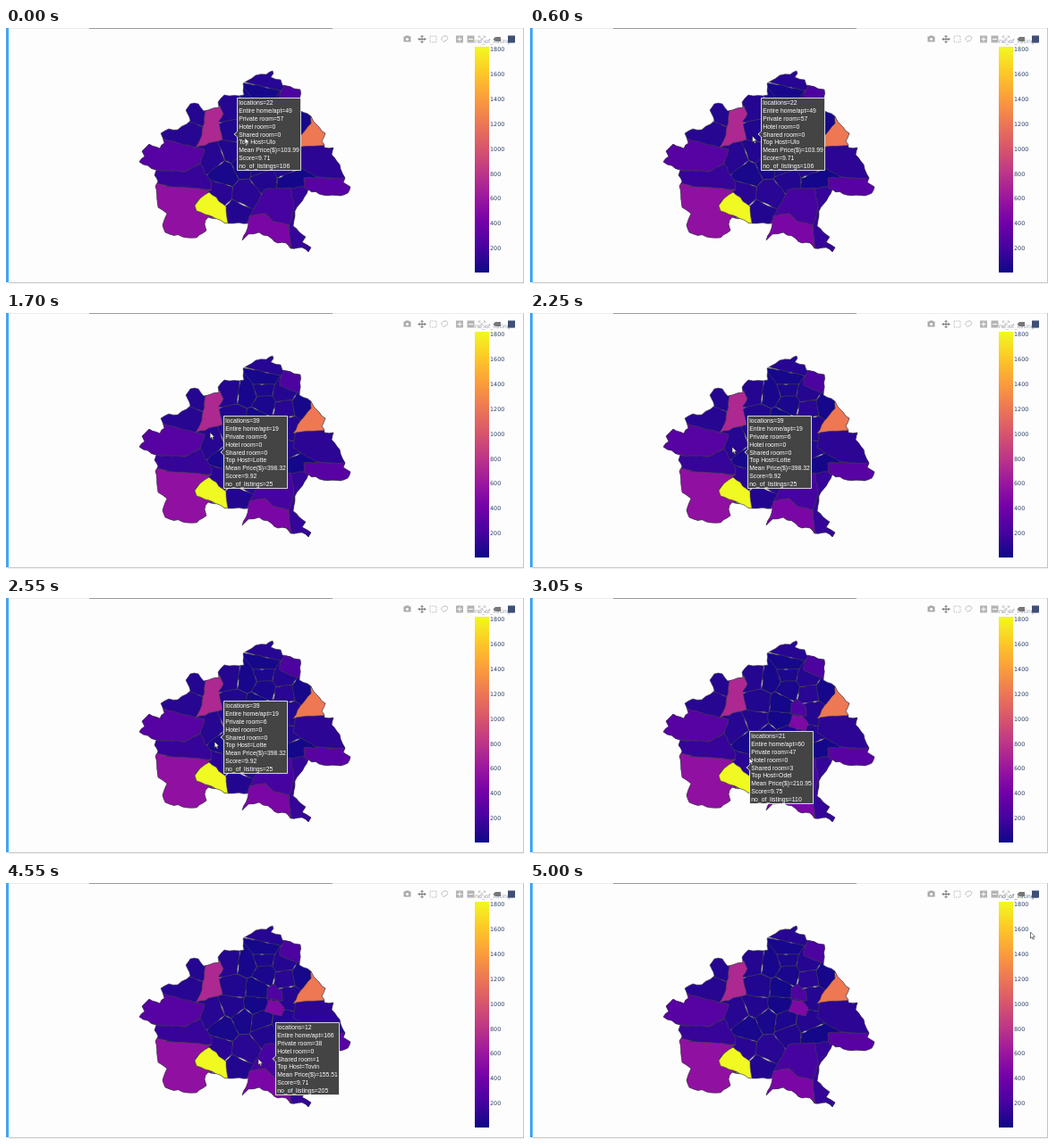
An HTML page for the animation above (5050 ms loop, 579 by 288 pixels).

```html
<!DOCTYPE html>
<html lang="en">
<head>
<meta charset="utf-8">
<title>Listings map</title>
<style>
  html, body { margin: 0; width: 100%; height: 100%; overflow: hidden; background: #fefdfe; }
  svg { display: block; width: 100%; height: 100%; }
  .label { font: 6.4px "DejaVu Sans", sans-serif; fill: #2a3f5f; }
  .tip { font: 6.8px "Liberation Sans", Arial, sans-serif; fill: #fff; }
  .area { stroke: #444; stroke-width: .6; stroke-linejoin: round; }
  .icon { fill: none; stroke: #bcbcbc; stroke-width: 1; }
</style>
</head>
<body>
<svg id="stage" viewBox="0 0 579 288"></svg>
<script>
const LOOP = 5050, STEP = 50, MAX = 1820;
const svg = document.getElementById('stage');

function add(parent, tag, attrs = {}, text) {
  const node = document.createElementNS('http://www.w3.org/2000/svg', tag);
  for (const key in attrs) node.setAttribute(key, attrs[key]);
  if (text !== undefined) node.textContent = text;
  parent.appendChild(node);
  return node;
}
const rect = (x, y, width, height, fill, parent = svg) =>
  add(parent, 'rect', { x, y, width, height, fill });
const mix = (a, b, k) => a + (b - a) * k;

const PLASMA = ['#0d0887', '#46039f', '#7201a8', '#9c179e', '#bd3786',
  '#d8576b', '#ed7953', '#fb9f3a', '#fdca26', '#f0f921'];

function colour(listings) {
  const v = Math.min(listings / MAX, .9999) * (PLASMA.length - 1), i = Math.floor(v);
  const channel = (hex, c) => parseInt(hex.slice(1 + c * 2, 3 + c * 2), 16);
  return `rgb(${[0, 1, 2].map(c =>
    Math.round(mix(channel(PLASMA[i], c), channel(PLASMA[i + 1], c), v - i)))})`;
}

const parse = s => s.split(' ').map(p => p.split(',').map(Number));

// Repeatable noise in -1..1 tied to a place
function noise(x, y) {
  const n = Math.sin(x * 12.9898 + y * 78.233) * 43758.5453;
  return (n - Math.floor(n)) * 2 - 1;
}

// Breaks each side into short pieces pushed sideways, like a surveyed border
function rough(points, amount) {
  return points.flatMap(([x0, y0], i) => {
    const [x1, y1] = points[(i + 1) % points.length];
    const len = Math.hypot(x1 - x0, y1 - y0), n = Math.max(1, Math.round(len / 5));
    return Array.from({ length: n }, (_, j) => {
      const x = mix(x0, x1, j / n), y = mix(y0, y1, j / n);
      const push = j ? noise(x, y) * amount / len : 0;
      return [x - (y1 - y0) * push, y + (x1 - x0) * push];
    });
  });
}

// Part of a polygon nearer to a than to b
function nearer(poly, a, b) {
  const side = ([x, y]) => (x - (a[0] + b[0]) / 2) * (b[0] - a[0]) + (y - (a[1] + b[1]) / 2) * (b[1] - a[1]);
  return poly.flatMap((p, i) => {
    const q = poly[(i + 1) % poly.length], sp = side(p), sq = side(q);
    const out = sp <= 0 ? [p] : [];
    if (sp * sq < 0) out.push([0, 1].map(c => mix(p[c], q[c], sp / (sp - sq))));
    return out;
  });
}

const OUTLINE = parse('298,48 299,51 296,55 307,58 309,64 322,68 329,69 328,92 341,99 344,105 357,118 ' +
  '353,127 356,134 366,134 364,142 373,153 379,168 377,173 385,178 382,185 374,188 350,186 338,181 ' +
  '323,205 321,222 335,234 331,240 341,246 338,251 331,246 318,247 313,241 304,241 297,236 283,229 ' +
  '271,231 264,238 271,219 249,219 226,212 222,220 224,227 213,235 202,235 178,229 175,221 180,208 ' +
  '170,201 167,177 170,172 166,165 168,159 149,150 155,144 152,138 160,130 172,135 177,129 173,118 ' +
  '182,113 192,114 206,104 201,92 206,85 215,85 221,93 238,89 237,83 244,75 266,75 265,62 279,53 291,52');

// Districts with their own shape; sides beyond the coast are cut by it
const DISTRICTS = [
  [280, '140,150 158,120 190,128 212,134 222,136 217,152 200,161 160,159'],
  [150, '160,159 200,161 217,152 230,174 229,181 184,178 160,172'],
  [550, '160,172 184,178 230,181 212,196 213,204 230,212 230,240 165,240'],
  [713, '223,92 239,87 243,96 238,104 242,125 212,134 219,120'],
  [MAX, '211,199 217,191 227,184 246,200 249,222 232,212 213,205'],
  [1210, '341,96 360,118 358,134 321,135 329,121 341,107'],
  [230, '307,72 312,62 332,68 330,92 306,81'],
  [110, '324,134 368,130 384,171 345,166 321,151'],
  [290, '333,168 384,168 390,180 380,190 350,189 333,180'],
  [140, '318,180 333,178 339,184 323,205 321,222 345,246 339,255 318,248 316,221'],
  [205, '289,181 318,179 322,202 316,221 299,217 290,208 272,211'],
  [450, '272,211 290,208 299,217 316,221 319,248 260,242'],
  [245, '291,130 292,118 299,113 308,121 309,132'],
  [470, '293,131 304,132 311,140 308,149 289,144']
];

// Inner quarters: whatever lies nearest to each centre
const CENTRES = parse('292,58 288,75 251,89 269,91 288,85 310,90 289,102 312,107 331,104 ' +
  '257,117 280,119 315,127 230,147 255,138 278,137 243,163 266,152 284,154 311,158 ' +
  '290,170 316,170 237,185 269,187 259,208');

function buildMap() {
  const coast = rough(OUTLINE, 1.1).join(' ');
  const clip = add(add(svg, 'defs'), 'clipPath', { id: 'city' });
  add(clip, 'polygon', { points: coast });
  const map = add(svg, 'g', { 'clip-path': 'url(#city)' });
  const area = (points, listings) =>
    add(map, 'polygon', { points: points.join(' '), fill: colour(listings), class: 'area' });

  const frame = parse('140,40 395,40 395,260 140,260');
  CENTRES.forEach(a => {
    const cell = CENTRES.reduce((poly, b) => a === b ? poly : nearer(poly, a, b), frame);
    area(rough(cell, .8), 60 + 45 * noise(...a));
  });
  DISTRICTS.forEach(([listings, shape]) => area(rough(parse(shape), .9), listings));
  add(svg, 'polygon', { points: coast, class: 'area', fill: 'none' });
}

function buildPage() {
  rect(0, 0, 579, 288, '#fefdfe');
  rect(0, 0, 579, 1, '#ececec');
  rect(93, 0, 272, 1, '#9b9b9b');
  rect(0, 0, 3, 285, '#42a5f5');
  rect(3, 285, 576, 1, '#c4c4c4');
  rect(578, 0, 1, 286, '#c4c4c4');
}

function buildScale() {
  const ramp = add(add(svg, 'defs'), 'linearGradient', { id: 'ramp', x1: 0, y1: 1, x2: 0, y2: 0 });
  PLASMA.forEach((c, i) => add(ramp, 'stop', { offset: i / 9, 'stop-color': c }));
  rect(524, 21, 16, 253, 'url(#ramp)');
  for (let v = 200; v <= 1800; v += 200)
    add(svg, 'text', { x: 541, y: 277 - v * .1393, class: 'label' }, v);
  return add(svg, 'text', { x: 524, y: 17.3, class: 'label' }, 'no_of_listings');
}

function buildToolbar() {
  const icon = (d, extra = {}) => add(svg, 'path', { d, class: 'icon', ...extra });
  rect(444.5, 9.5, 8, 6, '#aaa');
  rect(446.5, 8.5, 4, 2, '#aaa');
  add(svg, 'circle', { cx: 448.5, cy: 12.5, r: 1.6, fill: '#fff' });
  for (let turn = 0; turn < 360; turn += 90)
    icon('M465 12.5V8.5M463.5 10 465 8.5 466.5 10', { style: 'stroke:#777', transform: `rotate(${turn} 465 12.5)` });
  icon('M474 9h7v7h-7z', { 'stroke-dasharray': '1.5 1' });
  icon('M488 14c-3-2 0-5 3-5s4 3 1 5-4 0-3 2');
  [503, 515.5].forEach(x => rect(x, 8.5, 8, 8, '#b5b5b5'));
  icon('M504.5 12.5h5M507 10v5M517 12.5h5', { style: 'stroke:#fff' });
  for (let turn = 0; turn < 360; turn += 90)
    icon('M528.5 11V9h2M530 10.5l2 2', { transform: `rotate(${turn} 532 12.5)` });
  add(svg, 'path', { d: 'M544.5 12.5 547 10h6v5h-6z', fill: '#777' });
  rect(561, 8.5, 8, 8, '#3f4f75');
}

// Hover cards: start time, arrow tip x, box top, values
const CARDS = [
  [0, 255, 78, [22, 49, 57, 0, 0, 'Ulo', '103.99', 9.71, 106]],
  [800, 226, 70, [2, 644, 59, 6, 4, 'Bardolven', '290.61', 9.4, 713]],
  [1700, 240, 115, [39, 19, 6, 0, 0, 'Lotte', '398.32', 9.92, 25]],
  [2900, 242, 149, [21, 60, 47, 0, 3, 'Odel', '210.95', 9.75, 110]],
  [4250, 298, 156, [12, 166, 38, 0, 1, 'Tovin', '155.51', 9.71, 205]],
  [4700]
];
const FIELDS = ['locations', 'Entire home/apt', 'Private room', 'Hotel room', 'Shared room',
  'Top Host', 'Mean Price($)', 'Score', 'no_of_listings'];

// Pointer path: time, x, y
const PATH = [[0, 267, 123], [1200, 230, 119], [2250, 226, 150], [3050, 245, 179],
  [3850, 250, 186], [4550, 282, 197], [5000, 559.5, 55], [LOOP, 559.5, 55]];

buildPage();
buildMap();
const title = buildScale();
buildToolbar();

const card = add(svg, 'g');
add(card, 'path', {
  d: 'M0 41 3.5 38V.5H74.5V81.5H3.5V44z',
  fill: '#444', stroke: '#fff', 'stroke-width': .8
});
const lines = FIELDS.map((_, i) => add(card, 'text', { x: 5.3, y: 8.3 + i * 8.82, class: 'tip' }));
const pointer = add(svg, 'path', {
  d: 'M0 0V7L1.6 5.6 2.7 8.2 3.9 7.7 2.8 5.2H5z',
  fill: '#fff', stroke: '#222', 'stroke-width': .6
});

function pointerAt(t) {
  const i = PATH.findIndex(p => p[0] > t);
  const [t0, x0, y0] = PATH[i - 1], [t1, x1, y1] = PATH[i];
  const k = (t - t0) / (t1 - t0);
  return [mix(x0, x1, k), mix(y0, y1, k)];
}

let shown;
function render(time) {
  const t = Math.floor(time % LOOP / STEP) * STEP;
  const current = CARDS.filter(c => c[0] <= t).pop();
  if (current !== shown) {
    shown = current;
    const [, x, y, values] = current;
    card.setAttribute('display', values ? 'inline' : 'none');
    if (values) {
      card.setAttribute('transform', `translate(${x} ${y})`);
      lines.forEach((line, i) => line.textContent = FIELDS[i] + '=' + values[i]);
    }
  }
  title.setAttribute('opacity', t >= 5000 ? .8 : .5);
  pointer.setAttribute('transform', `translate(${pointerAt(t)})`);
}

const start = performance.now();
function tick() {
  render(performance.now() - start);
  requestAnimationFrame(tick);
}
tick();
</script>
</body>
</html>
```
